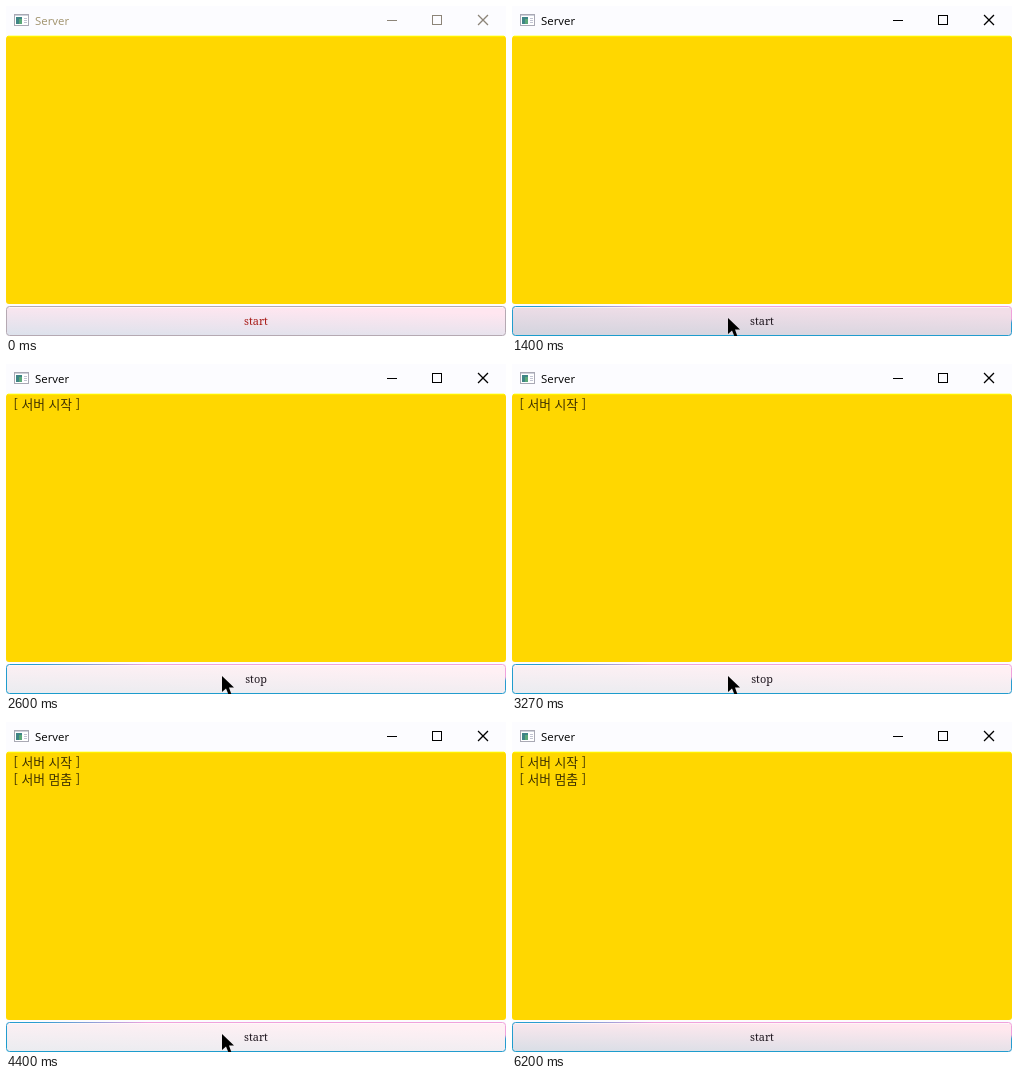
Write an HTML page that moves like this. It is 500 px wide and 330 px high and loops after 6270 ms.

```html
<!DOCTYPE html>
<html lang="ko">
<head>
<meta charset="utf-8">
<title>Server</title>
<style>
  html, body { margin: 0; width: 100%; height: 100%; overflow: hidden; background: #fcfcff; }
  svg { display: block; width: 500px; height: 330px; }
  .title { font: 11.4px "Open Sans", "Noto Sans", sans-serif; }
  .log { font: 12.8px "Noto Sans CJK KR", "Noto Sans CJK", sans-serif; fill: #3d3000; white-space: pre; }
  .label { font: 10.9px "Noto Serif", serif; text-anchor: middle; }
  .crisp { shape-rendering: crispEdges; }
</style>
</head>
<body>
<svg viewBox="0 0 500 330">
  <defs>
    <linearGradient id="face" x1="0" y1="1" x2=".4" y2="0">
      <stop id="low" offset="0"/>
      <stop id="high" offset="1"/>
    </linearGradient>
    <linearGradient id="ring" x1="0" y1="1" x2=".6" y2="0">
      <stop offset="0" stop-color="#1a9ccc"/>
      <stop offset=".76" stop-color="#2a9cd0"/>
      <stop offset=".86" stop-color="#f0a2dc"/>
    </linearGradient>
  </defs>

  <rect width="500" height="330" fill="#fcfcff"/>

  <g class="crisp">
    <rect x="8.5" y="8.5" width="14" height="11" fill="#fff" stroke="#a9a9b4"/>
    <path d="M9 9.5H22" stroke="#cfd2dc"/>
    <rect x="10" y="11" width="6" height="7" fill="#3f8585"/>
    <rect x="13" y="13" width="3" height="5" fill="#5aa878"/>
    <path d="M18 12.5H21M18 14.5H21M18 16.5H21" stroke="#c2c4d2"/>
  </g>
  <text id="title" class="title" x="29" y="18.5">Server</text>
  <g id="controls" fill="none">
    <path class="crisp" d="M381 14.5H391M426.5 9.5H435.5V18.5H426.5Z"/>
    <path d="M472.5 9.5L481.5 18.5M481.5 9.5L472.5 18.5" stroke-width="1.3" stroke-linecap="square"/>
  </g>

  <rect y="30" width="500" height="268" rx="3" fill="#ffd700"/>
  <path class="crisp" d="M2 29.5H498" stroke="#ffffa8"/>
  <path class="crisp" d="M1 30.5H499" stroke="#fff000"/>
  <text id="line1" class="log" x="7.5" y="45">[ 서버 시작 ]</text>
  <text id="line2" class="log" x="7.5" y="62">[ 서버 멈춤 ]</text>

  <rect id="button" x=".5" y="300.5" width="499" height="29" rx="3" fill="url(#face)"/>
  <path d="M3 301.5H497" stroke="#fff" stroke-opacity=".6"/>
  <text id="label" class="label" x="250" y="319"></text>

  <path id="arrow" d="M0 0V16L4 12.5L6.5 18.5H9.5L7 11.5H12Z" fill="#000"/>
  <g id="beam" class="crisp">
    <path d="M-3 -9H3V-7H1V7H3V8H-3V7H-1V-7H-3Z" fill="#100c00"/>
    <path d="M-3 -9H3V-7H-3Z" fill="#b01c08"/>
  </g>
</svg>
<script>
const LOOP = 6270, STEP = 200 / 3;
const START = 1460, STOP = 3790, PRESS = 130;
const $ = id => document.getElementById(id);

// pointer keys: time, x, y
const path = [
  [660, 244, 175], [800, 233, 242], [930, 225, 285], [1070, 216, 312],
  [4930, 216, 312], [5200, 222, 336]
];

// button faces: lower left, upper right
const faces = {
  idle: ["#dce2ec", "#ffe6f0"],
  hover: ["#eaecf0", "#fff0f4"],
  pressed: ["#d2d4de", "#f2dee8"],
  focused: ["#d8dee6", "#ffe8ee"]
};

const set = (id, attrs) => {
  for (const key in attrs) $(id).setAttribute(key, attrs[key]);
};
const show = (id, on) => set(id, { visibility: on ? "visible" : "hidden" });

function pointerAt(t) {
  for (let i = 1; i < path.length; i++) {
    const [t0, x0, y0] = path[i - 1], [t1, x1, y1] = path[i];
    if (t >= t0 && t < t1) {
      const k = (t - t0) / (t1 - t0);
      return [Math.round(x0 + (x1 - x0) * k), Math.round(y0 + (y1 - y0) * k)];
    }
  }
  return null;
}

function draw(time) {
  const t = Math.floor((time % LOOP) / STEP + 0.01) * STEP;
  const active = t >= START - PRESS;
  const running = t >= START && t < STOP;
  const pressed = [START, STOP].some(c => t >= c - PRESS && t < c);
  const pos = pointerAt(t);
  const overButton = pos && pos[1] >= 300;

  set("title", { fill: active ? "#000" : "#a0926c" });
  set("controls", { stroke: active ? "#000" : "#8c8478" });
  show("line1", t >= START);
  show("line2", t >= STOP);

  const face = pressed ? "pressed" : overButton ? "hover" : active ? "focused" : "idle";
  set("low", { "stop-color": faces[face][0] });
  set("high", { "stop-color": faces[face][1] });
  set("button", { stroke: active ? "url(#ring)" : "#b5a9b2" });
  $("label").textContent = running ? "stop" : "start";
  set("label", { fill: active ? "#201820" : "#a81c18" });

  show("arrow", overButton);
  show("beam", pos && !overButton);
  if (pos) {
    const transform = `translate(${pos[0]} ${pos[1]})`;
    set("arrow", { transform });
    set("beam", { transform });
  }
}

const begin = performance.now();
function tick() {
  draw(performance.now() - begin);
  requestAnimationFrame(tick);
}
tick();
</script>
</body>
</html>
```
